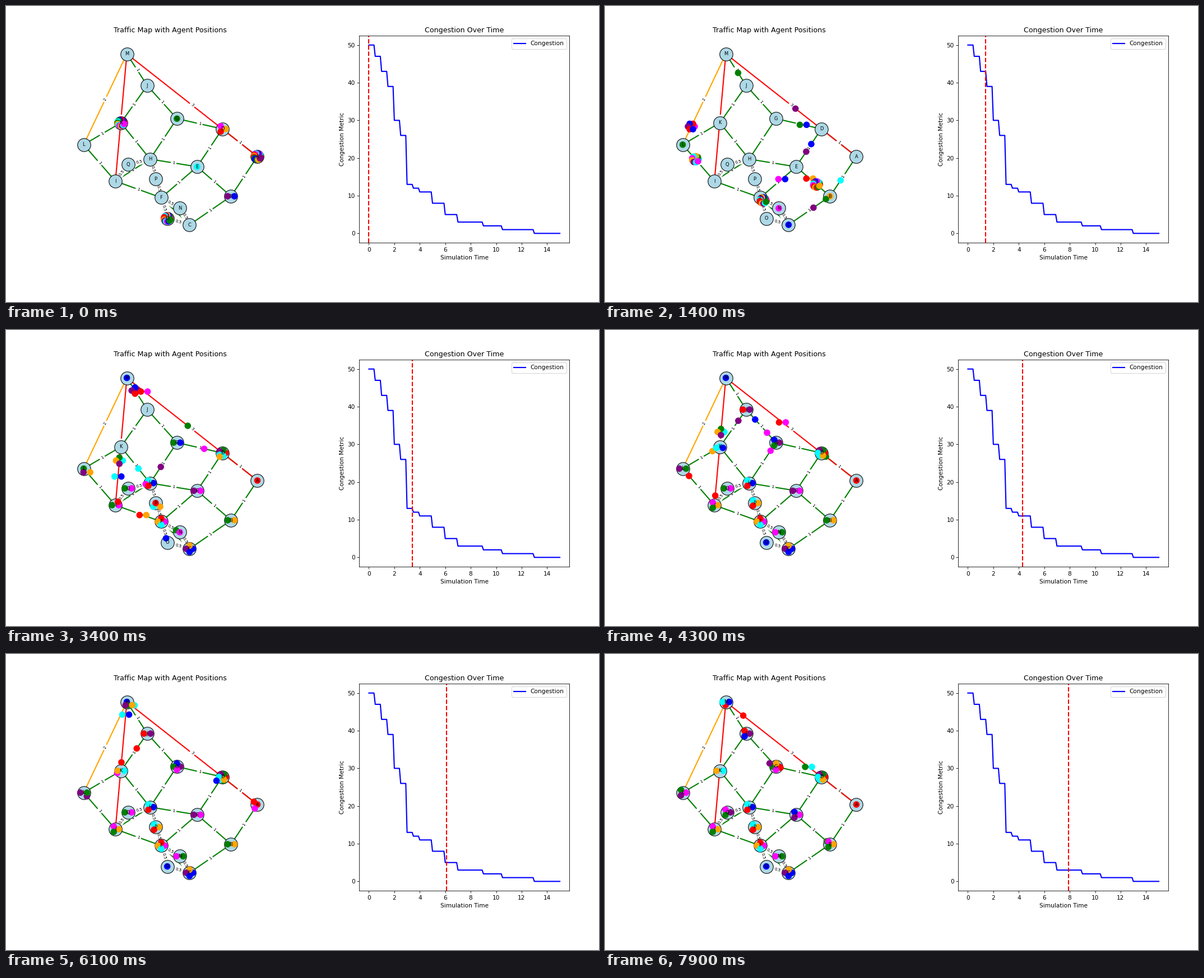
Animation, 1058 px wide and 529 px high, one loop 8000 ms. Source, as a matplotlib script:

```python
import math
from collections import defaultdict

import matplotlib.pyplot as plt
import numpy as np
from matplotlib.animation import FuncAnimation

DPI = 75.5715
STEP = 0.1
FRAMES = 80

# node centres in stage pixels, y pointing down
NODES = {
    "A": (448.5, 269), "B": (401.5, 340), "C": (327.5, 391),
    "D": (386, 219.7), "E": (341, 287.3), "F": (277, 342.5),
    "G": (305, 201.3), "H": (257, 273.6), "I": (195.2, 313),
    "J": (252, 142.2), "K": (205, 208.7), "L": (138.6, 247.8),
    "M": (215.6, 85.6), "N": (310, 361.5), "O": (287.7, 379.6),
    "P": (267, 309.2), "Q": (218, 283),
}
ROADS = {
    1: "AB AD BC BE CF DE DG EF EH FI GH GJ HI HK IL JK JM KL",
    2: "LM",
    3: "AM",
    4: "IM",
    0.5: "CN FN CO FO FP HP HQ IQ",
}
ROAD_COLORS = {0.5: "green", 1: "green", 2: "orange", 3: "red", 4: "red"}

COLORS = {"r": "red", "b": "blue", "g": "green", "p": "purple",
          "o": "orange", "c": "cyan", "m": "magenta"}
# colour code and route of each agent, in drawing order
AGENTS = """
b:BEFC o:DEBC m:DEF r:DEBA g:GJMADEB
r:ABED g:ABED p:BED c:EBAD c:ABED m:ABEDGJKL
b:ABEH p:ABEHG c:ABEH m:ABE
r:ABEF o:ABEFI r:ABEFIM g:ABEFN b:ADEFO b:ADG g:ADG
o:AB o:ABEF p:AMJKLIQ p:ABC
m:KLMAB r:KLMADG b:KLMJGDE p:KLMJ r:KLMJ b:KLM g:KL
c:KLIMA g:KLIMA o:KLIMJG c:KLIHK m:KLIQ o:KLIFP p:KLIMJG c:KLIFP m:KLI
r:OCFIQILKJMA m:OCFIQHG g:OCFI b:OCFIMJ o:OCFILK p:OCFIL c:OCFIM
r:OCFP r:OCFPH o:OCFED p:OCFE c:OCF m:OCN b:OC g:OCB g:OCFIQ
""".split()

# times at which the metric drops, and the value after each drop
DROPS = [(0.5, 47), (1, 43), (1.5, 39), (2, 30), (2.5, 26), (3, 13),
         (3.5, 12), (4, 11), (5, 8), (6, 5), (7, 3), (9, 2),
         (10.5, 1), (13, 0)]

weights = {}
for w, pairs in ROADS.items():
    for a, b in pairs.split():
        weights[a + b] = weights[b + a] = w


def make_track(route):
    legs = [weights[a + b] for a, b in zip(route, route[1:])]
    times = np.concatenate([[0], np.cumsum(legs)])
    xs, ys = zip(*(NODES[n] for n in route))
    return times, xs, ys


tracks = [make_track(agent[2:]) for agent in AGENTS]


def agent_positions(t):
    """Points on the routes; agents sharing a spot spread around it."""
    spots = [(np.interp(t, ts, xs), np.interp(t, ts, ys))
             for ts, xs, ys in tracks]
    groups = defaultdict(list)
    for i, (x, y) in enumerate(spots):
        groups[round(x, 3), round(y, 3)].append(i)
    for (x, y), members in groups.items():
        n = len(members)
        if n > 1:
            for k, i in enumerate(members):
                a = 2 * math.pi * k / n
                spots[i] = x + 6 * math.cos(a), y - 5.6 * math.sin(a)
    return spots


def draw_road(ax, a, b, w):
    (x1, y1), (x2, y2) = sorted([NODES[a], NODES[b]])
    ax.plot([x1, x2], [y1, y2], color=ROAD_COLORS[w], lw=2, zorder=1,
            solid_capstyle="butt")
    angle = -math.degrees(math.atan2(y2 - y1, x2 - x1))
    ax.text((x1 + x2) / 2, (y1 + y2) / 2, str(w), size=7, rotation=angle,
            ha="center", va="center", zorder=1.5,
            bbox=dict(boxstyle="round", ec="white", fc="white"))


plt.rcParams["font.family"] = "DejaVu Sans"
fig, (road_ax, plot_ax) = plt.subplots(1, 2, figsize=(14, 7), dpi=DPI)
fig.subplots_adjust(left=0.1, right=0.95, top=0.9, bottom=0.2, wspace=0.4)

# road map, with data units equal to stage pixels
road_ax.set_title("Traffic Map with Agent Positions")
road_ax.set_xlim(105.8, 480.51)
road_ax.set_ylim(423.2, 52.9)
road_ax.axis("off")
for w, pairs in ROADS.items():
    for a, b in pairs.split():
        draw_road(road_ax, a, b, w)
road_ax.scatter(*zip(*NODES.values()), s=500, c="lightblue",
                edgecolors="black", linewidths=1, zorder=2)
for name, (x, y) in NODES.items():
    road_ax.text(x, y, name, size=8, ha="center", va="center", zorder=4)
dots = road_ax.scatter(*zip(*agent_positions(0)), s=100, linewidths=1,
                       c=[COLORS[agent[0]] for agent in AGENTS], zorder=3)

# congestion curve
curve_t, curve_v = [0], [50]
for t, v in DROPS:
    curve_t += [t - STEP, t]
    curve_v += [curve_v[-1], v]
plot_ax.plot(curve_t + [15], curve_v + [0], color="blue", lw=2,
             label="Congestion")
plot_ax.set_xlim(-0.75, 15.75)
plot_ax.set_ylim(-2.5, 52.5)
plot_ax.set_title("Congestion Over Time")
plot_ax.set_xlabel("Simulation Time")
plot_ax.set_ylabel("Congestion Metric")
plot_ax.legend(loc="upper right")
cursor = plot_ax.axvline(0, color="red", ls="--", lw=2)


def update(frame):
    t = round(frame * STEP, 3)
    dots.set_offsets(agent_positions(t))
    cursor.set_xdata([t, t])
    return dots, cursor


anim = FuncAnimation(fig, update, frames=FRAMES, interval=100, repeat=True,
                     repeat_delay=0, blit=False)
plt.show()
```
